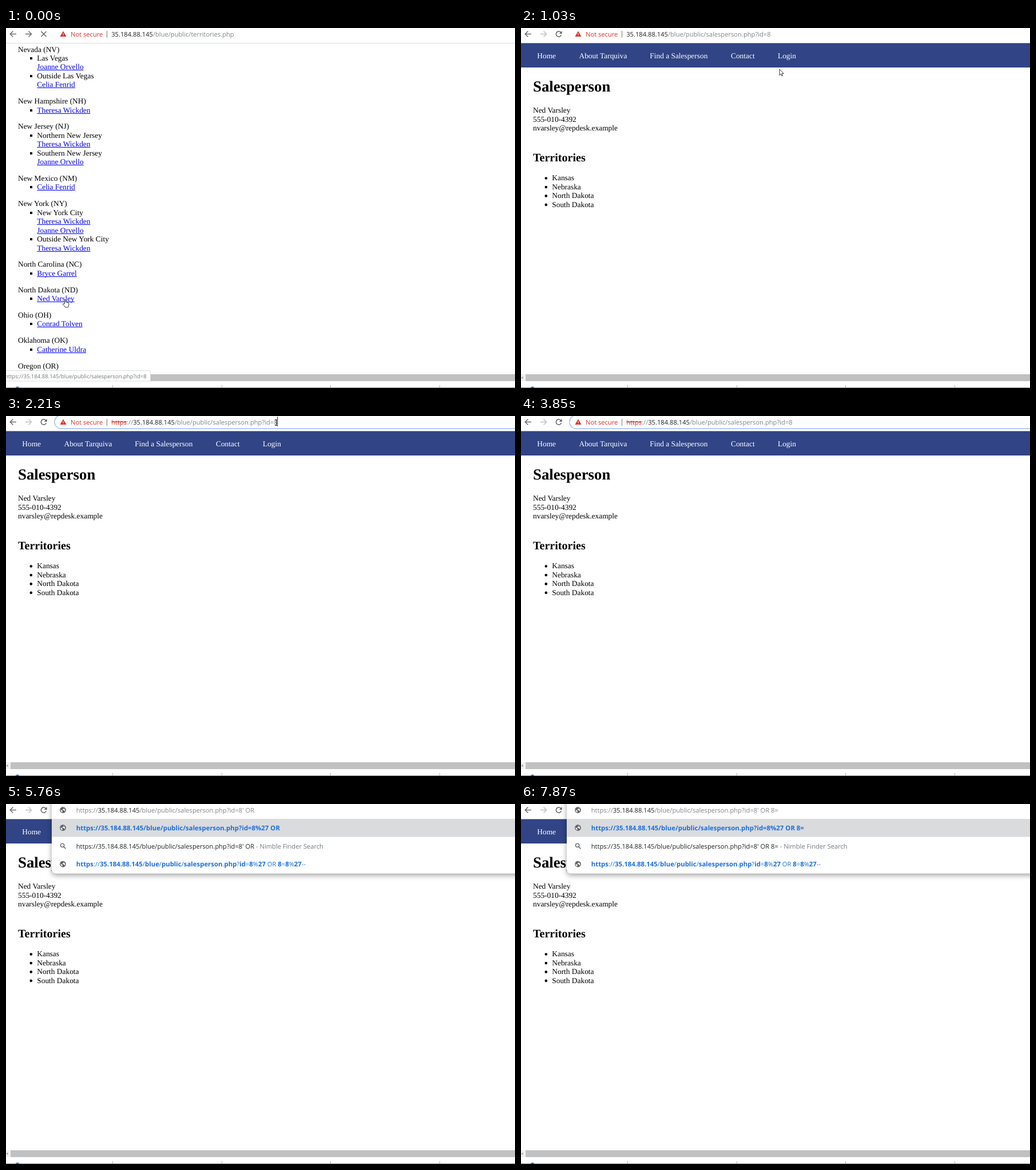
An HTML page with a canvas for the animation above (8 s loop, 890x629 px).

```html
<!DOCTYPE html>
<html lang="en">
<head>
<meta charset="utf-8">
<title>Salesperson lookup</title>
<style>
html, body { margin: 0; width: 100%; height: 100%; overflow: hidden; background: #fff; }
canvas { display: block; width: 890px; height: 629px; }
</style>
</head>
<body>
<canvas id="stage" width="890" height="629"></canvas>
<script>
const ctx = document.getElementById('stage').getContext('2d');
const LOOP = 8000;
const W = 890;

const EM = 13.38;
const LINE = 15.45;
const serif = (size, weight = 400) => `${weight} ${size}px "Liberation Serif", "Times New Roman", serif`;
const sans = (size, weight = 400) => `${weight} ${size}px "Open Sans", "Noto Sans", sans-serif`;
const PAGE = serif(EM);
const UI = sans(11.17);
const UI_BOLD = sans(11.4, 700);
const SMALL = sans(9.53);

const INK = '#202124', ICON = '#5f6368', PATH = '#80848a', RED = '#d93025', BLUE = '#1a6fe0';
const HOST = '35.184.88.145';
const DIR = '/blue/public/';
const PROFILE = DIR + 'salesperson.php?id=8';

const JO = '>Joanne Orvello', CE = '>Celia Fenrid', TH = '>Theresa Wickden';
// '*' starts a bulleted line, '>' marks a link
const states = [
  ['Nevada (NV)', '*Las Vegas', JO, '*Outside Las Vegas', CE],
  ['New Hampshire (NH)', '*' + TH],
  ['New Jersey (NJ)', '*Northern New Jersey', TH, '*Southern New Jersey', JO],
  ['New Mexico (NM)', '*' + CE],
  ['New York (NY)', '*New York City', TH, JO, '*Outside New York City', TH],
  ['North Carolina (NC)', '*>Bryce Garrel'],
  ['North Dakota (ND)', '*>Ned Varsley'],
  ['Ohio (OH)', '*>Conrad Tolven'],
  ['Oklahoma (OK)', '*>Catherine Uldra'],
  ['Oregon (OR)']
];

// Timed values: [start, value...]
const typing = [[4000, "'"], [4280, "' "], [4720, "' O"], [5020, "' OR"], [5330, "' OR "], [6810, "' OR 8"], [7280, "' OR 8="]];
const carets = [[0, 0], [1620, 437], [1770, 0], [2210, 474], [2830, 0], [3260, 474], [3850, 0], [4000, 415], [4280, 419],
  [4720, 427], [5020, 434], [5330, 437], [5760, 0], [6350, 437], [6810, 443], [7280, 452], [7870, 0]];
const pointers = [[0, 'hand', 98.5, 474], [270, 'arrow', 150, 405], [420, 'arrow', 194.5, 331.5], [580, 'arrow', 426, 141.5],
  [1030, 'arrow', 452, 72], [1160, 'arrow', 460.5, 23.5], [1310, 'arrow', 471.5, 21.5], [1460, 'beam', 472, 11.5], [2980, '']];

const handPath = new Path2D('M4 8V1.5Q4 .5 5 .5Q6 .5 6 1.5V5Q7.8 4.3 8 5.4Q9.6 4.8 9.8 6Q11.3 5.6 11.3 7V10Q11.3 12 10 14H5Q3.5 11.5 1 9Q.5 7.5 2 7.5Z');
const arrowPath = new Path2D('M0 0V10.5L2.4 8.3L4 12L5.6 11.3L4.1 7.7H7.4Z');

const at = (list, t) => list.filter(e => e[0] <= t).pop();

function rect(x, y, w, h, color) {
  ctx.fillStyle = color;
  ctx.fillRect(x, y, w, h);
}

function text(str, x, y, font, color = '#000') {
  ctx.font = font;
  ctx.fillStyle = color;
  ctx.fillText(str, x, y);
  return x + ctx.measureText(str).width;
}

function runs(x, y, parts) {
  for (const [str, color, font = UI] of parts) x = text(str, x, y, font, color);
  return x;
}

function stroke(color, width, points) {
  ctx.strokeStyle = color;
  ctx.lineWidth = width;
  ctx.beginPath();
  points.forEach(([x, y], i) => i ? ctx.lineTo(x, y) : ctx.moveTo(x, y));
  ctx.stroke();
}

function disc(x, y, r, color) {
  ctx.fillStyle = color;
  ctx.beginPath();
  ctx.arc(x, y, r, 0, Math.PI * 2);
  ctx.fill();
}

function drawTerritories() {
  let y = 41.5;
  for (const [name, ...rows] of states) {
    text(name, 21, y, PAGE);
    for (let row of rows) {
      y += LINE;
      if (row[0] === '*') {
        rect(42, Math.round(y - 6), 4, 4, '#000');
        row = row.slice(1);
      }
      if (row[0] === '>') {
        const end = text(row.slice(1), 54.3, y, PAGE, '#0000ee');
        rect(54.3, Math.round(y + 1), end - 54.3, 1, '#0000ee');
      } else {
        text(row, 54.3, y, PAGE);
      }
    }
    y += LINE + EM;
  }
}

function drawProfile() {
  rect(0, 27, W, 42, '#304486');
  const links = [['Home', 28.3], ['About Tarquiva', 101.5], ['Find a Salesperson', 225.3], ['Contact', 367], ['Login', 449]];
  for (const [label, x] of links) text(label, x, 53, PAGE, '#fff');
  text('Salesperson', 21, 111.4, serif(EM * 2, 700));
  ['Ned Varsley', '555-010-4392', 'nvarsley@repdesk.example'].forEach((s, i) => text(s, 21, 148.3 + i * LINE, PAGE));
  text('Territories', 21, 232.6, serif(EM * 1.5, 700));
  ['Kansas', 'Nebraska', 'North Dakota', 'South Dakota'].forEach((s, i) => {
    const y = 266.4 + i * LINE;
    disc(43.8, y - 3.9, 2.3, '#000');
    text(s, 54.3, y, PAGE);
  });
}

function drawFooter() {
  rect(0, 605, W, 24, '#fff');
  rect(0, 605, 8, 12, '#f1f1f1');
  rect(8, 605, W, 12, '#c1c1c1');
  ctx.fillStyle = '#a3a3a3';
  ctx.beginPath();
  ctx.moveTo(0.5, 611);
  ctx.lineTo(3.5, 608.5);
  ctx.lineTo(3.5, 613.5);
  ctx.fill();
  for (const x of [186, 377, 567, 758]) rect(x, 624, 1, 4, '#b0b0b0');
  rect(0, 628, W, 1, '#85888c');
  disc(20, 630, 3.5, '#1a66c8');
}

function drawStatus(t) {
  if (t >= 730) return;
  const wait = t >= 140;
  const width = wait ? 421.5 : 252.5;
  ctx.beginPath();
  ctx.roundRect(-5, 598.5, width + 5, 18.5, [0, 3, 0, 0]);
  ctx.fillStyle = '#fff';
  ctx.fill();
  ctx.strokeStyle = '#dedfe0';
  ctx.lineWidth = 1;
  ctx.stroke();
  ctx.globalAlpha = t >= 580 ? 0.5 : 1;
  text(wait ? `Waiting for ${HOST}...` : 'https://' + HOST + PROFILE, -2, 611.6, SMALL, '#74787c');
  ctx.globalAlpha = 1;
}

function navArrow(x, dir, color) {
  const p = d => x + d * dir;
  stroke(color, 1.4, [[p(5.5), 10.5], [p(-4.8), 10.5]]);
  stroke(color, 1.4, [[p(0), 5.5], [p(-5), 10.5], [p(0), 15.5]]);
}

function drawReload() {
  ctx.strokeStyle = ICON;
  ctx.lineWidth = 1.5;
  ctx.beginPath();
  ctx.arc(66, 10.5, 4.7, 0.35, 5.5);
  ctx.stroke();
  ctx.fillStyle = ICON;
  ctx.beginPath();
  ctx.moveTo(71.6, 5);
  ctx.lineTo(71.6, 10);
  ctx.lineTo(66.6, 10);
  ctx.fill();
}

function drawWarning() {
  ctx.fillStyle = RED;
  ctx.beginPath();
  ctx.moveTo(100, 5.5);
  ctx.lineTo(105.5, 15);
  ctx.lineTo(94.5, 15);
  ctx.fill();
  rect(99.5, 9, 1, 3, '#fff');
  rect(99.5, 12.8, 1, 1, '#fff');
  text('Not secure', 113, 14.5, UI, RED);
  rect(176, 5, 1, 12, '#777');
}

function drawToolbar(t) {
  rect(0, 0, W, 26, '#fff');
  rect(0, 26, W, 1, '#dcdddf');
  navArrow(12.3, 1, ICON);
  navArrow(39.5, -1, t < 420 ? ICON : '#babcbe');
  if (t < 420) {
    stroke(ICON, 1.5, [[61.5, 6], [70.5, 15]]);
    stroke(ICON, 1.5, [[70.5, 6], [61.5, 15]]);
  } else {
    drawReload();
  }
  if (t >= 4000) return;

  if (t >= 1460) {
    ctx.beginPath();
    ctx.roundRect(85, -1.5, 830, 23.7, 11.8);
    if (t < 1620) {
      ctx.fillStyle = '#eceded';
      ctx.fill();
    } else {
      ctx.strokeStyle = '#a9c6f7';
      ctx.lineWidth = 1.7;
      ctx.stroke();
    }
  }
  drawWarning();

  const selected = t >= 1770 && t < 2210;
  const path = t < 140 ? DIR + 'territories.php' : PROFILE;
  if (selected) rect(184, 2, 253, 17, '#0078d7');
  let x = 184.2;
  if (t >= 2210) {
    const end = text('https', x, 14.5, UI, RED);
    rect(x, 10, end - x, 1, RED);
    x = text('://', end, 14.5, UI, PATH);
  }
  runs(x, 14.5, [[HOST, selected ? '#fff' : INK], [path, selected ? '#fff' : PATH]]);
}

function globe(y) {
  disc(99.5, y, 5.4, ICON);
  ctx.fillStyle = '#fff';
  ctx.fill(new Path2D(`M95.5 ${y - 1}l3 2.6v2.6q-3-1-3-5.2zM99 ${y - 4}h2.6l-.6 2-2 .6 -.4 1.6h2.6l1.2 2 1-.4q-.2-4-2.6-5.4z`));
}

function magnifier(y) {
  ctx.strokeStyle = ICON;
  ctx.lineWidth = 1.3;
  ctx.beginPath();
  ctx.arc(98.6, y - 1.2, 3.1, 0, Math.PI * 2);
  ctx.stroke();
  stroke(ICON, 1.5, [[100.8, y + 1], [104.3, y + 4.5]]);
}

function drawDropdown(t) {
  const typed = at(typing, t)[1];
  const query = typed.trim();
  const x = 122.7;
  const url = 'https://' + HOST + PROFILE;

  ctx.save();
  ctx.shadowColor = 'rgba(0,0,0,0.38)';
  ctx.shadowBlur = 10;
  ctx.shadowOffsetY = 3;
  ctx.fillStyle = '#fff';
  ctx.beginPath();
  ctx.roundRect(80, -20, 840, 141.5, 7);
  ctx.fill();
  ctx.restore();
  rect(80, 26, W, 31.5, '#dadbdd');

  globe(10.5);
  runs(x, 14.5, [['https://', PATH], [HOST, INK], [PROFILE + typed, PATH]]);
  globe(41.5);
  text(url + query.replace("'", '%27'), x, 45.5, UI_BOLD, BLUE);
  magnifier(73.5);
  runs(x, 77.5, [[url + query, INK], [' - Nimble Finder Search', '#74787c']]);
  globe(105);
  const tail = ' OR 8=8%27--';
  const parts = t < 4720
    ? [[url + '%27', BLUE, UI_BOLD], [tail, '#4a86e0']]
    : (url + '%27' + tail).match(/[\d.]{5,}|[a-z\d]+|[^a-z\d]+/g)
      .map(s => [s, BLUE, /[a-z\d]/.test(s) ? UI_BOLD : UI]);
  runs(x, 109, parts);
}

function drawPointer(t) {
  const [, kind, x, y] = at(pointers, t);
  if (!kind) return;
  if (kind === 'beam') {
    for (const dy of [-5, 5]) stroke('#333', 1, [[x - 2, y + dy], [x + 3, y + dy]]);
    stroke('#333', 1, [[x + 0.5, y - 5], [x + 0.5, y + 5]]);
    return;
  }
  const shape = kind === 'hand' ? handPath : arrowPath;
  ctx.save();
  ctx.translate(x, y);
  ctx.fillStyle = '#fff';
  ctx.fill(shape);
  ctx.strokeStyle = '#222';
  ctx.lineWidth = 0.9;
  ctx.stroke(shape);
  ctx.restore();
}

function draw(t) {
  ctx.textRendering = 'geometricPrecision';
  rect(0, 0, W, 629, '#fff');
  if (t < 420) drawTerritories();
  else drawProfile();
  drawFooter();
  drawStatus(t);
  drawToolbar(t);
  if (t >= 420) rect(0, 26.5, W, 1, '#304486');
  if (t >= 4000) drawDropdown(t);
  const caret = at(carets, t)[1];
  if (caret) rect(caret, 1, 1, 17, '#333');
  drawPointer(t);
}

const start = performance.now();
function tick() {
  draw((performance.now() - start) % LOOP);
  requestAnimationFrame(tick);
}
tick();
</script>
</body>
</html>
```
